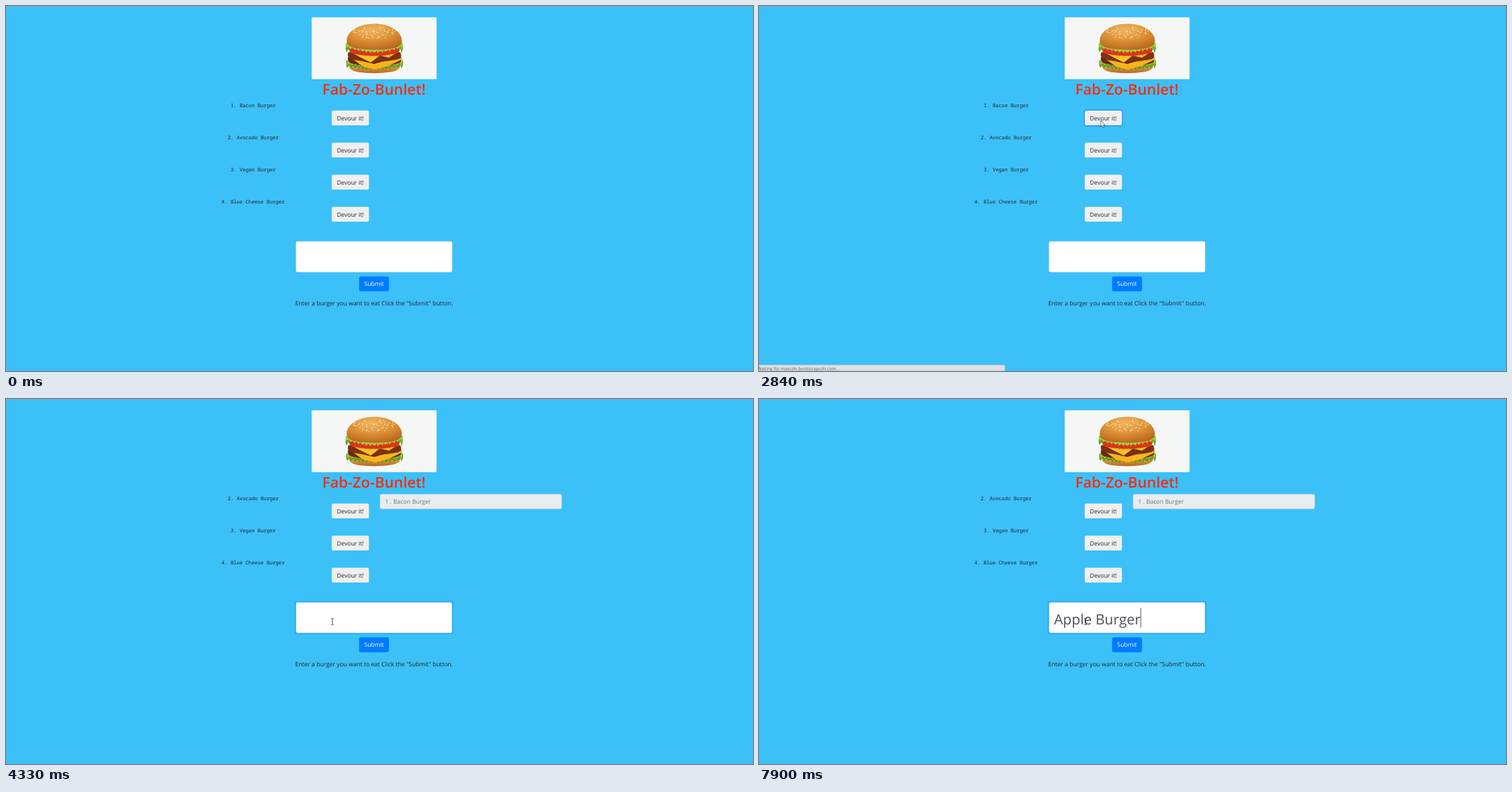
Animation, 1071 px wide and 523 px high, one loop 8 s. Source, as an HTML page:

```html
<!DOCTYPE html>
<html lang="en">
<head>
<meta charset="utf-8">
<title>Burger list</title>
<style>
  html, body { margin: 0; width: 100%; height: 100%; overflow: hidden; background: #3cc0f8; }
  svg { display: block; width: 100vw; height: 100vh; }
  text { font: 8.55px "Open Sans", "Noto Sans", sans-serif; fill: #212529; white-space: pre; text-rendering: geometricPrecision; }
  .mid { text-anchor: middle; }
  text.title { font-size: 21.1px; font-weight: 600; fill: #ff2a0a; }
  text.item { font: 7.18px "Noto Sans Mono", "DejaVu Sans Mono", monospace; }
  text.entry { font-size: 20.3px; fill: #495057; }
  text.state { font-size: 6.33px; fill: #5a5f63; }
</style>
</head>
<body>
<svg viewBox="0 0 1071 523" preserveAspectRatio="none">
  <defs>
    <radialGradient id="crust" cx=".45" cy=".25" r=".8">
      <stop offset="0" stop-color="#efb660"/>
      <stop offset=".5" stop-color="#dd9136"/>
      <stop offset="1" stop-color="#b5631b"/>
    </radialGradient>
    <linearGradient id="base" x2="0" y2="1">
      <stop offset="0" stop-color="#eeb55c"/>
      <stop offset="1" stop-color="#b9681f"/>
    </linearGradient>
  </defs>
  <rect width="1071" height="523" fill="#3cc0f8"/>
  <rect width="1071" height="1" fill="#7fa9bd"/>

  <rect x="438.3" y="16.2" width="179" height="88.6" fill="#f5f7f6"/>
  <g id="burger"></g>
  <text class="title mid" x="527.6" y="127">Fab-Zo-Bunlet!</text>

  <g id="rows"></g>

  <g id="eaten">
    <rect x="536.3" y="136.4" width="260.4" height="20.9" rx="2.2" fill="#e9ecef" stroke="#ced4da" stroke-width=".6"/>
    <text x="543.6" y="150.3" style="fill:#6c757d">1 . Bacon Burger</text>
  </g>

  <g id="form">
    <rect id="focus" x="414" y="335.6" width="227.4" height="47.4" rx="3.4" fill="#007bff" fill-opacity=".38"/>
    <rect id="box" x="415.8" y="337.3" width="223.8" height="44" rx="2.2" fill="#fff" stroke-width=".6"/>
    <text id="entry" class="entry" x="423" y="368.5"></text>
    <rect id="caret" y="345.2" width=".9" height="28.6" fill="#495057"/>
    <rect x="506.2" y="387.4" width="42.8" height="21.4" rx="2.2" fill="#007bff"/>
    <text class="mid" x="527.7" y="401.4" style="fill:#fff">Submit</text>
    <text class="mid" x="527.8" y="428.9">Enter a burger you want to eat Click the "Submit" button.</text>
  </g>

  <g id="status">
    <path d="M0 514.3H351Q352.5 514.3 352.5 516V523H0Z" fill="#dee1e4" stroke="#a9b8c0" stroke-width=".5"/>
    <text id="state" class="state" x="-2.5" y="522.2"></text>
  </g>

  <g id="pointer">
    <circle id="click" cy="-1.5" fill="#f2e614"/>
    <path id="arrow" d="M0 0V9L2 7.2 3.5 10.6 5 10 3.5 6.7H6.2Z" fill="#fff" stroke="#222" stroke-width=".6"/>
    <path id="hand" d="M-.9 .9Q-.9 0 0 0T.9 .9V4.3Q2 3.6 2.5 4.7 3.6 4.1 4 5.2 5.4 4.8 5.4 6.3V8.6Q5.3 10.3 4.4 11.2V12.6H-.2V11.4L-3 7.6Q-3.3 6.2-2 6.3L-.9 7.5Z" fill="#fff" stroke="#222" stroke-width=".7"/>
    <path id="beam" d="M-1.8-4.3H-.5L0-3.9.5-4.3H1.8M0-3.9V3.9M-1.8 4.3H-.5L0 3.9.5 4.3H1.8" fill="none" stroke="#222" stroke-width=".8"/>
  </g>
</svg>
<script>
const LOOP = 8000, STEP = 70, ROW = 46;
const RELOAD = 2910, FOCUS = 3780, CLICKS = [1280, 3700];
const NAMES = ["Bacon", "Avocado", "Vegan", "Blue Cheese"];
const ENTRY = "Apple Burger";
const KEYS = [5410, 5580, 6130, 6360, 6430, 6510, 7060, 7290, 7520, 7600, 7750, 7900];
// Pointer stops: time, x, y
const PATH = [
  [200, 1000, 510], [430, 800, 330], [660, 590, 150], [760, 535, 129],
  [890, 497, 150], [970, 490, 164], [3240, 490, 164], [3310, 486, 200],
  [3450, 467, 331], [3660, 468, 319], [LOOP, 468, 319]
];

const $ = id => document.getElementById(id);

function add(parent, tag, attrs, text) {
  const el = document.createElementNS("http://www.w3.org/2000/svg", tag);
  for (const key in attrs) el.setAttribute(key, attrs[key]);
  if (text) el.textContent = text;
  return parent.appendChild(el);
}

const show = (id, on) => $(id).setAttribute("visibility", on ? "visible" : "hidden");
const clamp = v => Math.max(0, Math.min(1, v));

function drawBurger() {
  const g = $("burger");
  const part = (d, fill) => add(g, "path", { d, fill });
  // Frilly leaf between two edges, sagging in the middle
  const leaf = (x0, x1, y, sag, depth, fill) => {
    let d = `M${x0} ${y}`;
    for (let i = 0; i <= 48; i++) {
      const u = i / 48, bow = sag * Math.sin(Math.PI * u);
      const frill = depth * (1 + .3 * Math.sin(i * 1.9) + .2 * Math.sin(i * 3.1));
      d += `L${(x0 + (x1 - x0) * u).toFixed(1)} ${(y + bow + frill).toFixed(1)}`;
    }
    part(d + `L${x1} ${y}Q${(x0 + x1) / 2} ${y + sag} ${x0} ${y}Z`, fill);
  };
  part("M491 82Q528 88 566 82Q567 92 552 94.5Q528 98 504 94.5Q490 92 491 82Z", "url(#base)");
  leaf(488, 569, 78, 4, 8, "#5d9a1d");
  leaf(489, 568, 78, 3, 5, "#9cc63c");
  part("M491 72Q528 80 566 72Q569 79 563 82Q528 91 494 82Q488 78 491 72Z", "#6a2812");
  part("M497 76L528 83 563 73 569 76 548 86 529 91 512 87Z", "#f8b41c");
  part("M492 66Q528 73 565 66Q569 73 563 76Q528 84 494 76Q488 72 491 66Z", "#7c3116");
  part("M493 65Q528 73 563 65L549 74 536 71 523 81 507 73Z", "#fdc02a");
  leaf(487, 569, 53, 7, 10, "#65a321");
  part("M493 60Q528 68 562 60Q566 65 560 68Q528 75 496 68Q491 65 493 60Z", "#dc3517");
  leaf(487, 569, 53, 8, 5, "#a4cc44");
  part("M489 54C485 38 504 25.4 528 25.4S571 38 567 54Q563 60 549 61.5Q528 64 507 61.5Q493 60 489 54Z", "url(#crust)");
  let seed = 11;
  const rand = () => (seed = seed * 16807 % 2147483647) / 2147483647;
  for (let i = 0; i < 60; i++) {
    const a = rand() * 2 * Math.PI, r = Math.sqrt(rand());
    const x = 527 + 31 * r * Math.cos(a), y = 37.5 + 9.5 * r * Math.sin(a);
    add(g, "ellipse", { cx: x, cy: y, rx: 1, ry: .6, fill: "#f8dfa6", transform: `rotate(${rand() * 180} ${x} ${y})` });
  }
}

function drawRows() {
  return NAMES.map((name, i) => {
    const g = add($("rows"), "g", { transform: `translate(0 ${i * ROW})` });
    add(g, "text", { class: "item mid", x: 354.3, y: 144.7 }, `${i + 1}. ${name} Burger`);
    const ring = add(g, "rect", { x: 465.9, y: 148.6, width: 55.6, height: 23.6, rx: 3, fill: "#0b82ee", opacity: 0 });
    add(g, "rect", { x: 467, y: 149.7, width: 53.4, height: 21.4, rx: 2.2, fill: "#efefef" });
    add(g, "text", { class: "mid", x: 493.7, y: 163.6 }, "Devour it!");
    return { g, ring };
  });
}

function pointerAt(t) {
  const i = Math.max(1, PATH.findIndex(p => p[0] > t));
  const [t0, x0, y0] = PATH[i - 1], [t1, x1, y1] = PATH[i];
  const u = clamp((t - t0) / (t1 - t0));
  return [x0 + (x1 - x0) * u, y0 + (y1 - y0) * u];
}

function drawPointer(t) {
  const start = t < 3000 ? 200 : 3240;
  const [x, y] = pointerAt(start + Math.floor((t - start) / STEP) * STEP);
  const beam = t >= 3380;
  const hand = t >= 1050 && t < 1660 || t >= 3070 && t < 3240;
  $("pointer").setAttribute("transform", `translate(${x} ${y})`);
  show("beam", beam);
  show("hand", hand);
  show("arrow", t >= 200 && !beam && !hand);

  const age = Math.min(...CLICKS.map(c => t < c ? Infinity : t - c));
  show("click", age < 150);
  $("click").setAttribute("r", age < 90 ? 5.4 : 10);
  $("click").setAttribute("opacity", age < 90 ? .8 : .25);
}

function drawForm(t) {
  const focus = clamp((t - FOCUS) / 150);
  $("focus").setAttribute("opacity", focus);
  $("box").setAttribute("stroke", focus > .5 ? "#80bdff" : "#ced4da");
  const entry = $("entry");
  entry.textContent = ENTRY.slice(0, KEYS.filter(k => k <= t).length);
  show("caret", t >= FOCUS && t < 4330 || t >= 4880);
  $("caret").setAttribute("x", 423 + (entry.textContent ? entry.getComputedTextLength() : 0));
}

function drawStatus(t) {
  $("status").setAttribute("opacity", t < 1660 ? 0 : t < 1750 ? .6 : 1 - clamp((t - 3240) / 250));
  const host = t < 2360 ? "hungry-burger-list.example.com" : "maxcdn.bootstrapcdn.com";
  $("state").textContent = `Waiting for ${host}...`;
}

drawBurger();
const rows = drawRows();

function update(t) {
  const after = t >= RELOAD;
  const shift = after ? `translate(0 ${-ROW})` : "";
  $("rows").setAttribute("transform", shift);
  $("form").setAttribute("transform", shift);
  rows[0].g.setAttribute("visibility", after ? "hidden" : "visible");
  rows[0].ring.setAttribute("opacity", .8 * clamp((t - CLICKS[0]) / 150));
  show("eaten", after);
  drawForm(t);
  drawStatus(t);
  drawPointer(t);
}

const begin = performance.now();
function tick() {
  update((performance.now() - begin) % LOOP);
  requestAnimationFrame(tick);
}
tick();
</script>
</body>
</html>
```
